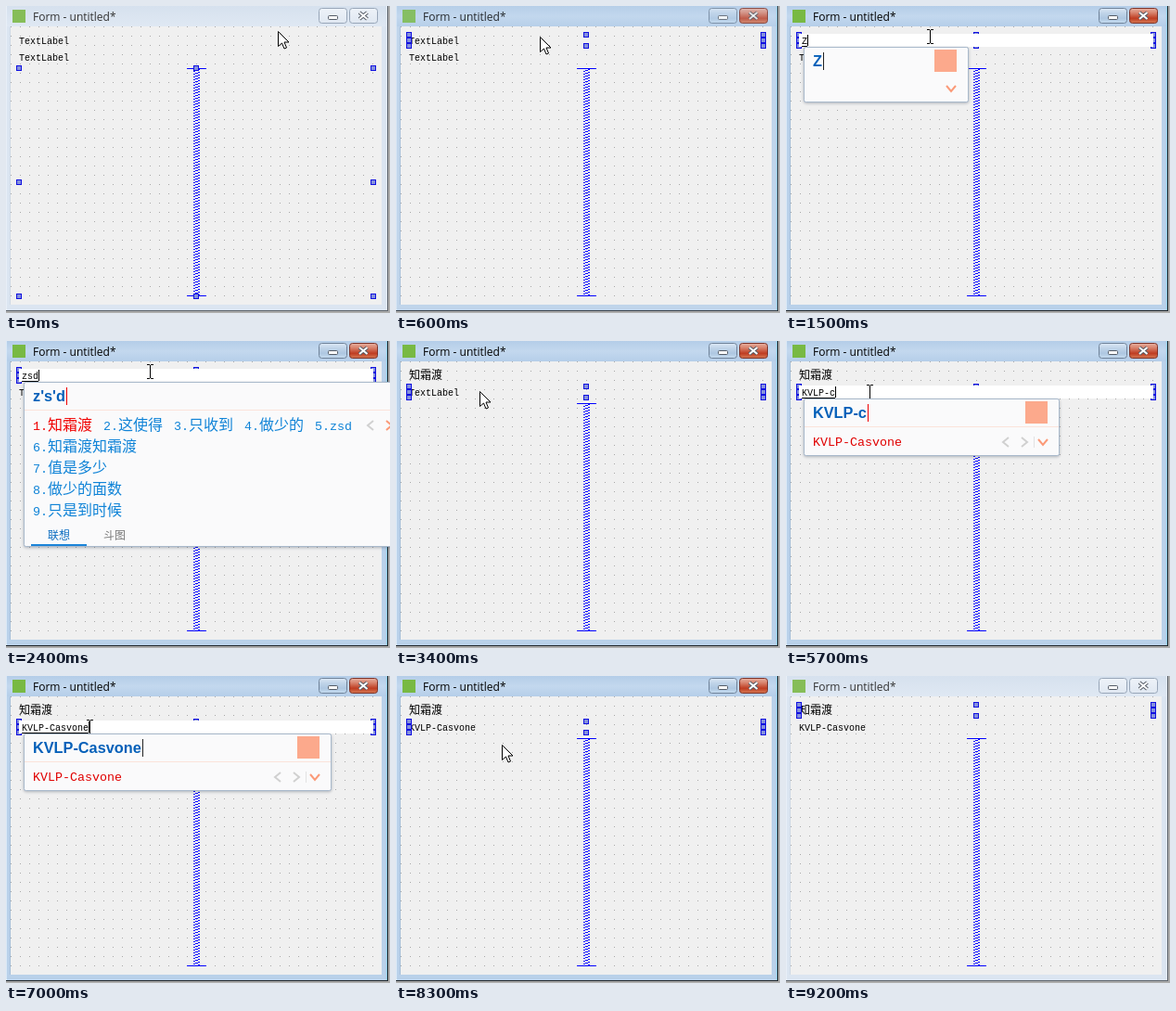
Recreate the animation shown at these times as an HTML page with a canvas. Size 414x331 px, loop 9300 ms.

```html
<!DOCTYPE html>
<html lang="zh">
<head>
<meta charset="utf-8">
<title>Form editor</title>
<style>
html, body { margin: 0; width: 414px; height: 331px; overflow: hidden; background: #ababab; }
canvas { display: block; width: 414px; height: 331px; }
</style>
</head>
<body>
<canvas id="stage" width="414" height="331"></canvas>
<script>
const ctx = document.getElementById('stage').getContext('2d');
const LOOP = 9300, STEP = 100;
const NAME = '知霜渡', TAG = 'KVLP-Casvone';
const BLUE = '#0000ff', ORANGE = '#fb9a78', INK = '#0560b9';

// time, selected part, part being edited
const scenes = [
  [0, 'spacer'], [300, 'one'], [900, 'one', 'one'], [3200, 'one'], [3300, 'two'],
  [3800, 'two', 'two'], [7600, 'spacer'], [8200, 'two'], [8600, 'one']
];

// time, shape, x, y
const pointer = [
  [0, 'arrow', 293, 27], [100, 'arrow', 170, 33], [300, 'arrow', 160, 34], [500, 'arrow', 155, 33],
  [900, 'beam', 155, 33], [3200, 'arrow', 130, 38], [3300, 'arrow', 105, 48], [3400, 'arrow', 90, 54],
  [3800, 'beam', 90, 55], [7600, 'arrow', 100, 70], [7700, 'arrow', 115, 95], [7800, 'arrow', 128, 120],
  [7900, 'arrow', 132, 128], [8200, 'arrow', 122, 100], [8300, 'arrow', 114, 74], [8400, 'arrow', 110, 54],
  [8600, 'arrow', 110, 46], [8700, 'arrow', 110, 40], [8900, 'none', 0, 0]
];

// time, typed text, panel layout, right edge, dark caret
const typing = [
  [0, '', 'none'],
  [1500, 'Z', 'bare', 197, true], [1600, 'ZS', 'echo', 245], [1800, 'Z', 'echo', 236], [2000, '', 'none'],
  [2200, 'z', 'row'], [2300, "z's", 'row'], [2400, "z's'd", 'full', 451], [2500, '', 'none'],
  [4500, TAG.slice(0, 1), 'bare', 197], [4700, TAG.slice(0, 2), 'echo', 246],
  [4900, TAG.slice(0, 3), 'echo', 256], [5100, TAG.slice(0, 4), 'tag', 279],
  [5300, TAG.slice(0, 5), 'tag', 285], [5500, TAG.slice(0, 5) + 'c', 'tag', 295],
  [5800, TAG.slice(0, 5), 'tag', 285], [6000, TAG.slice(0, 6), 'tag', 298],
  [6200, TAG.slice(0, 7), 'tag', 307], [6400, TAG.slice(0, 8), 'tag', 316],
  [6600, TAG.slice(0, 9), 'tag', 325], [6700, TAG.slice(0, 10), 'tag', 334],
  [6900, TAG.slice(0, 11), 'tag', 343], [7000, TAG, 'tag', 351, true],
  [7200, '', 'none']
];

const shortLists = {
  'z': ['在', '这', '中', '只', '做'],
  "z's": ['这是', '正式', '知识', '真是', '在上']
};
const fullList = [NAME, '这使得', '只收到', '做少的', 'zsd', NAME + NAME, '值是多少', '做少的面数', '只是到时候'];

const at = (table, t) => table.filter(row => row[0] <= t).pop();

function box(x, y, w, h, color) {
  ctx.fillStyle = color;
  ctx.fillRect(x, y, w, h);
}

function frame(x, y, w, h, r, fill, edge) {
  ctx.beginPath();
  ctx.roundRect(x + .5, y + .5, w - 1, h - 1, r);
  ctx.fillStyle = fill;
  ctx.fill();
  ctx.strokeStyle = edge;
  ctx.lineWidth = 1;
  ctx.stroke();
}

function path(points, color, width) {
  ctx.beginPath();
  points.forEach(([x, y]) => ctx.lineTo(x, y));
  ctx.strokeStyle = color;
  ctx.lineWidth = width;
  ctx.stroke();
}

function shade(y, h, ...colors) {
  const g = ctx.createLinearGradient(0, y, 0, y + h);
  colors.forEach((c, i) => g.addColorStop(i / (colors.length - 1), c));
  return g;
}

// Half-width Latin cells beside full-width Han cells; returns the end x.
function cells(text, x, y, size, color) {
  ctx.fillStyle = color;
  for (const ch of text) {
    const wide = ch > '\u2e7f';
    ctx.font = wide ? `${size}px "Noto Sans CJK SC", "Noto Sans CJK", sans-serif`
                    : `${size / 1.2}px "Liberation Mono", monospace`;
    ctx.fillText(ch, x, y);
    x += wide ? size : size / 2;
  }
  return x;
}

function windowFrame(active) {
  const base = active ? '#b9d1ea' : '#dbe5f1';
  box(0, 0, 412, 329, base);
  box(0, 0, 412, 22, active ? shade(0, 22, '#b4cde8', '#c3d8ee', '#b5cee9') : shade(0, 22, '#d6e1ee', '#dfe8f3'));
  box(0, 0, 1, 329, active ? '#d9e8f7' : '#e8eff7');
  box(4, 22, 1, 300, active ? '#a6bfd9' : '#cfdae6');
  box(410, 0, 1, 329, active ? '#8fd0e8' : '#e4ecf5');
  box(411, 0, 1, 329, active ? '#20262c' : '#5d646c');
  box(0, 328, 412, 1, active ? '#20262c' : '#5d646c');

  box(7, 4, 14, 14, active ? '#78b943' : '#86bd58');
  ctx.font = '12px "Open Sans", "Noto Sans", sans-serif';
  ctx.fillStyle = active ? '#000' : '#333';
  ctx.fillText('Form - untitled*', 29, 16);

  const edge = active ? '#6f8299' : '#98a6b8';
  frame(337, 2, 31, 17, 3, active ? shade(2, 17, '#dfeaf6', '#c0d4e9', '#aec7e1', '#c9dff2')
                                : shade(2, 17, '#eef3f9', '#dfe7f1'), edge);
  frame(370, 2, 31, 17, 3, active ? shade(2, 17, '#eab5a6', '#d77f69', '#bf3d22', '#d9805a')
                                : shade(2, 17, '#eef3f9', '#dfe7f1'), active ? '#7c3329' : edge);
  frame(347, 10, 11, 5, 1, '#fff', '#535b66');
  for (const [color, width] of [['#535b66', 4], ['#fff', 2]]) {
    path([[381, 7], [389.5, 14]], color, width);
    path([[389.5, 7], [381, 14]], color, width);
  }
}

function form() {
  box(5, 22, 400, 300, '#f0f0f0');
  for (let x = 5; x < 405; x += 10)
    for (let y = 22; y < 322; y += 10) box(x, y, 1, 1, '#a8a8a8');
}

function spring() {
  ctx.save();
  ctx.beginPath();
  ctx.rect(190, 67, 30, 246);
  ctx.clip();
  for (let y = 67; y < 313; y += 3) {
    box(202, y, 3, 1, '#fff');
    box(205, y + 1, 4, 1, '#fff');
  }
  for (let y = 67; y < 313; y += 3) {
    box(202, y + 3, 2, 1, BLUE);
    box(204, y + 2, 3, 1, BLUE);
    box(207, y + 1, 2, 1, BLUE);
  }
  ctx.restore();
  box(195, 67, 21, 1, BLUE);
  box(195, 312, 21, 1, BLUE);
}

function handles(top, bottom) {
  const mid = Math.floor((top + bottom) / 2);
  for (const y of [top, mid, bottom])
    for (const x of [14, 205, 396]) {
      if (x === 205 && y === mid) continue;
      box(x - 3, y - 3, 6, 6, '#1010e0');
      box(x - 2, y - 2, 4, 4, '#8490dc');
    }
}

function editor(top, text, mode, caret) {
  box(14, top - 1, 382, 14, '#fff');
  if (mode === 'marked') box(17, top, text.length * 6, 12, '#3399ff');
  const end = cells(text, 17, top + 10, 12, mode === 'marked' ? '#fff' : '#000');
  if (mode === 'preedit') box(17, top + 12, end - 17, 1, '#000');
  if (caret) box(end, top, 1, 12, '#000');
}

function chevron(x, y, dx, dy, color) {
  const tip = [x + dx * 3, y + dy * 3];
  path([[x - dx * 3 - dy * 5, y - dy * 3 - dx * 5], tip, [x - dx * 3 + dy * 5, y - dy * 3 + dx * 5]], color, 2);
}

function candidates(list, top) {
  let x = 29, y = top + 52;
  list.forEach((word, i) => {
    if (i > 4) { x = 29; y += 23; }
    x = cells(`${i + 1}.${word}`, x, y, 16, i ? '#0f83d7' : '#f00000') + 12;
  });
}

function inputPanel(top, [, text, layout, edge, dark]) {
  const list = layout === 'full' ? fullList : shortLists[text];
  const right = edge || 29 + list.join('').length * 16 + list.length * 28 + 66;
  const height = layout === 'bare' ? 60 : layout === 'full' ? 178 : 62;

  ctx.save();
  ctx.shadowColor = 'rgba(60,70,90,.3)';
  ctx.shadowBlur = 3;
  ctx.shadowOffsetY = 1;
  frame(19, top, right - 19, height, 2, '#fafafb', '#a9b9cb');
  ctx.restore();
  frame(19, top, right - 19, height, 2, '#fafafb', '#a9b9cb');

  box(right - 37, top + 3, 24, 24, '#fca98c');
  ctx.font = 'bold 16.3px "Liberation Sans", Arial, sans-serif';
  ctx.fillStyle = INK;
  ctx.fillText(text, 29, top + 21);
  box(Math.round(29 + ctx.measureText(text).width) + 1, top + 6, 1, 19, dark ? '#222' : '#f00000');

  if (layout === 'bare') {
    chevron(right - 19, top + 45, 0, 1, ORANGE);
    return;
  }
  box(20, top + 30, right - 21, 1, '#fbe3da');
  const mid = top + 47;
  chevron(right - 58, mid, -1, 0, '#d0d0d0');
  chevron(right - 38, mid, 1, 0, list ? ORANGE : '#d0d0d0');
  box(right - 28, mid - 6, 1, 12, '#e2e2e2');
  chevron(right - 18, mid, 0, 1, ORANGE);

  if (list) candidates(list, top);
  else cells(layout === 'tag' ? TAG : text, 29, top + 51, 16, '#e00000');

  if (layout === 'full') {
    cells('联想', 45, top + 170, 12, '#0b6cc0');
    cells('斗图', 105, top + 170, 12, '#777');
    box(27, top + 175, 60, 2, '#1b84d8');
  }
}

function drawPointer([, shape, x, y]) {
  if (shape === 'beam') {
    for (const dx of [-3, 1]) {
      box(x + dx, y - 8, 3, 1, '#000');
      box(x + dx, y + 7, 3, 1, '#000');
    }
    box(x, y - 7, 1, 14, '#000');
  } else if (shape === 'arrow') {
    ctx.beginPath();
    [[0, 0], [0, 16], [4, 12.5], [6.5, 18.5], [9, 17.5], [6.5, 11.5], [11.5, 11.5]]
      .forEach(([dx, dy]) => ctx.lineTo(x + .5 + dx, y + .5 + dy));
    ctx.closePath();
    ctx.fillStyle = '#fff';
    ctx.fill();
    ctx.strokeStyle = '#000';
    ctx.lineWidth = 1;
    ctx.stroke();
  }
}

function draw(t) {
  const [, selected, editing] = at(scenes, t);
  const input = at(typing, t);
  const focus = t >= 9200 ? 0 : Math.min(1, Math.max(0, (t - 200) / 500));

  box(0, 0, 414, 331, '#ababab');
  windowFrame(false);
  if (focus) {
    ctx.globalAlpha = focus;
    windowFrame(true);
    ctx.globalAlpha = 1;
  }
  form();
  spring();

  const labels = {
    one: { top: 31, text: t < 2500 ? 'TextLabel' : NAME },
    two: { top: 49, text: t < 7200 ? 'TextLabel' : TAG }
  };
  for (const { top, text } of Object.values(labels)) cells(text, 14, top + 10, 12, '#000');

  if (selected === 'spacer') handles(67, 313);
  else handles(labels[selected].top, labels[selected].top + 12);

  if (editing) {
    const { top, text } = labels[editing];
    const preedit = input[1].replace(/'/g, '');
    const blank = t >= 2000 && t < 2200;
    const marked = text === 'TextLabel';
    const caret = !(t >= 3000 && t < 3200) && !(t >= 4200 && t < 4500);
    if (preedit || blank) editor(top, preedit, 'preedit', true);
    else editor(top, text, marked ? 'marked' : 'plain', caret);
  }
  drawPointer(at(pointer, t));
  if (input[1]) inputPanel(labels[editing].top + 13, input);
}

const start = performance.now();
function tick() {
  const t = (performance.now() - start) % LOOP;
  draw(Math.floor(t / STEP) * STEP);
  requestAnimationFrame(tick);
}
tick();
</script>
</body>
</html>
```
